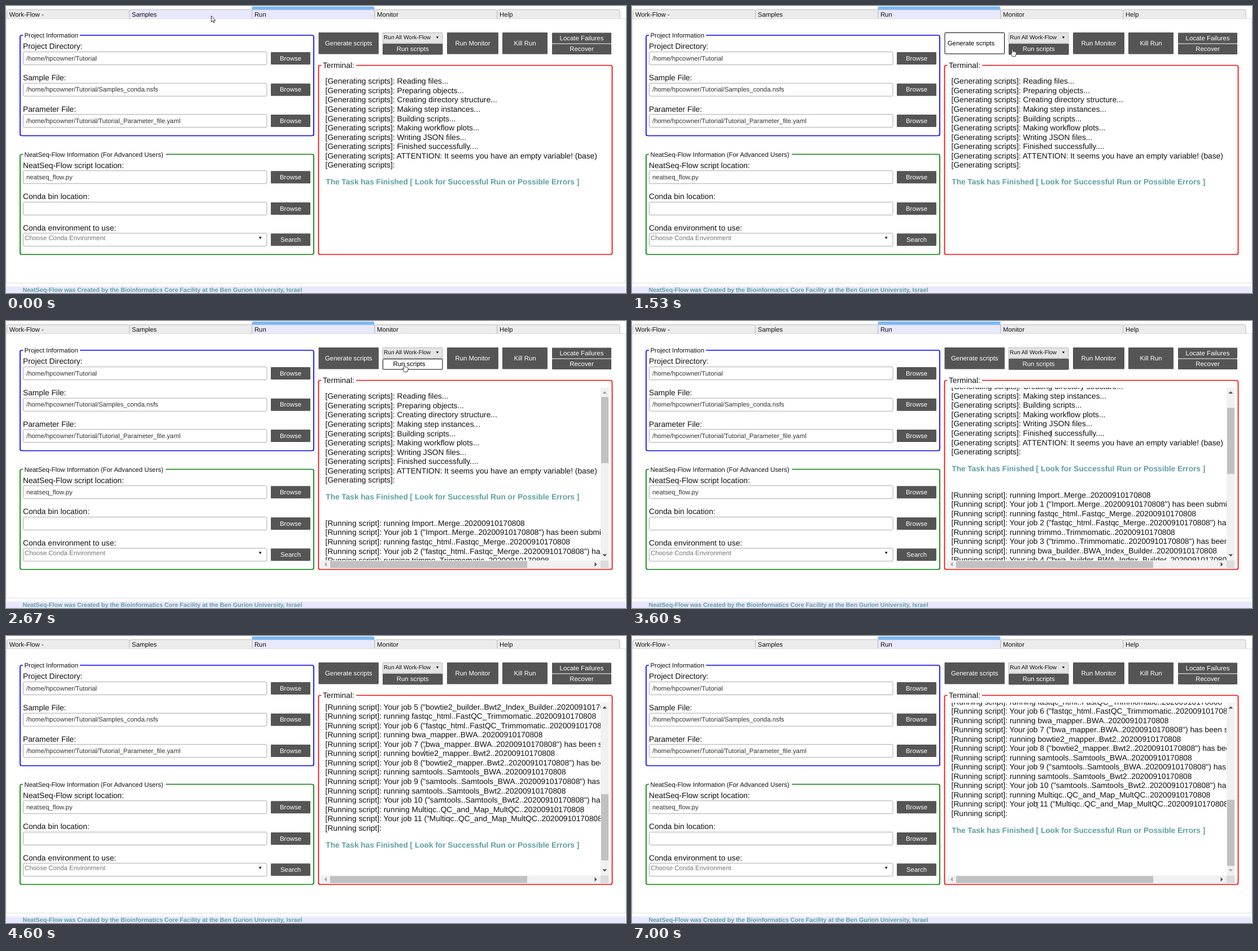
An HTML page with a canvas for the animation above (7.59 s loop, 1098 px wide and 510 px high).

```html
<!DOCTYPE html>
<html lang="en">
<head>
<meta charset="utf-8">
<title>Workflow runner</title>
<style>
html, body { margin: 0; width: 100%; height: 100%; overflow: hidden; background: #fff; }
canvas { display: block; width: 1098px; height: 510px; }
</style>
</head>
<body>
<canvas id="stage" width="1098" height="510"></canvas>
<script>
const ctx = document.getElementById('stage').getContext('2d');
const LOOP = 7590, TICK = 1000 / 15;
const SMALL = 11.39, BIG = 13.76, BOLD = 13.67, LINE = 16.52;
const DARK = [85, 85, 85], WHITE = [255, 255, 255], BLACK = [0, 0, 0];
const LAVENDER = '#e8e8ff', TEAL = '#5f9ea0', INK = '#111';
const VIEW = { x: 558, y: 118.5, w: 495, h: 307 };
const MAX_SCROLL = 407.6, RUN_AT = 2470;

// Terminal contents, y is the middle of the line before scrolling
const stages = ['Reading files...', 'Preparing objects...', 'Creating directory structure...',
  'Making step instances...', 'Building scripts...', 'Making workflow plots...',
  'Writing JSON files...', 'Finished successfully....',
  'ATTENTION: It seems you have an empty variable! (base)', ''];
const jobs = ['Import..Merge', 'fastqc_html..Fastqc_Merge', 'trimmo..Trimmomatic',
  'bwa_builder..BWA_Index_Builder', 'bowtie2_builder..Bwt2_Index_Builder',
  'fastqc_html..FastQC_Trimmomatic', 'bwa_mapper..BWA', 'bowtie2_mapper..Bwt2',
  'samtools..Samtools_BWA', 'samtools..Samtools_Bwt2', 'Multiqc..QC_and_Map_MultQC'];
const DONE = 'The Task has Finished [ Look for Successful Run or Possible Errors ]';

const generated = stages.map((s, i) => ({ s: '[Generating scripts]: ' + s, y: 133.5 + i * LINE }));
generated.push({ s: DONE, y: 312.5, bold: true });
const ran = [];
const addRun = s => ran.push({ s: '[Running script]: ' + s, y: 359 + ran.length * LINE });
jobs.forEach((job, i) => {
  const id = job + '..20200910170808';
  addRun('running ' + id);
  addRun(`Your job ${i + 1} ("${id}") has been submitted`);
});
addRun('');
ran.push({ s: DONE, y: 753, bold: true });

// Keyframes: time followed by values
const cursorKeys = [
  [0, 363, 17.5], [200, 363, 17.5], [470, 405, 26], [800, 520, 52], [1000, 557, 60],
  [1270, 606, 66], [1530, 672.5, 76], [1700, 700, 81], [2000, 705, 77], [3260, 705, 77],
  [3600, 741.5, 201], [5930, 741.5, 201], [6000, 737, 210], [6730, 722.5, 275.5], [7000, 718, 300.5]
];
const scrollKeys = [
  [3530, 0], [3800, 190.5], [3935, 190.5], [4000, 285.8], [4535, 285.8],
  [4600, 381.5], [4667, 400], [4733, MAX_SCROLL]
];

const mix = (a, b, p) => a + (b - a) * p;
const clamp = v => Math.max(0, Math.min(1, v));
const rgb = (a, b, p) => `rgb(${a.map((v, i) => Math.round(mix(v, b[i], p)))})`;

function track(keys, t) {
  if (t <= keys[0][0]) return keys[0].slice(1);
  for (let i = 1; i < keys.length; i++) {
    const a = keys[i - 1], b = keys[i];
    if (t < b[0]) {
      const p = (t - a[0]) / (b[0] - a[0]);
      return a.slice(1).map((v, j) => mix(v, b[j + 1], p));
    }
  }
  return keys[keys.length - 1].slice(1);
}

// Hover amount with a 0.4 s transition in and out
function hover(t, from, to) {
  const ease = p => 1 - (1 - p) ** 2.4;
  return t < to ? ease(clamp((t - from) / 400)) : 1 - ease(clamp((t - to) / 400));
}

function text(s, x, y, size = SMALL, color = INK, align = 'left', bold = false) {
  ctx.font = `${bold ? 'bold ' : ''}${size}px "Liberation Sans", Arial, sans-serif`;
  ctx.textAlign = align;
  ctx.fillStyle = color;
  ctx.fillText(s, x, y + size * 0.36);
}

function rect(x, y, w, h, color) {
  ctx.fillStyle = color;
  ctx.fillRect(x, y, w, h);
}

function box(x, y, w, h, r, fill, stroke, width = 1) {
  ctx.beginPath();
  ctx.roundRect(x, y, w, h, r);
  if (fill) { ctx.fillStyle = fill; ctx.fill(); }
  if (stroke) { ctx.strokeStyle = stroke; ctx.lineWidth = width; ctx.stroke(); }
}

function shape(points, fill, stroke, width = 1) {
  ctx.beginPath();
  points.forEach(([x, y]) => ctx.lineTo(x, y));
  ctx.closePath();
  ctx.fillStyle = fill;
  ctx.fill();
  if (stroke) { ctx.strokeStyle = stroke; ctx.lineWidth = width; ctx.stroke(); }
}

function button(label, x, y, w, h, hot = 0) {
  box(x, y, w, h, 1, rgb(DARK, WHITE, hot));
  if (hot > 0) box(x + 0.5, y + 0.5, w - 1, h - 1, 1, null, rgb(DARK, BLACK, hot));
  text(label, x + w / 2 - 6.3 * hot, y + h / 2 - 0.4, SMALL, rgb(WHITE, BLACK, hot), 'center');
}

function fieldset(title, x, y, w, h, gapEnd, color, size) {
  box(x, y, w, h, 3, null, color, 1.7);
  rect(x + 5, y - 3, gapEnd - x - 5, 6, '#fff');
  text(title, x + 7.5, y, size);
}

function field(label, value, y, action) {
  text(label, 30, y - 21, BIG);
  box(30.5, y - 11, 431.5, 23, 2, '#fff', '#aaa');
  text(value, 36, y, SMALL, '#333');
  button(action, 469, y - 10.5, 70, 22);
}

function dropArrow(x, y, w, h) {
  shape([[x - w / 2, y], [x + w / 2, y], [x, y + h]], '#000');
}

function tabs(overSamples) {
  ['Work-Flow -', 'Samples', 'Run', 'Monitor', 'Help'].forEach((name, i) => {
    const x = 1.5 + i * 217.1, active = i === 2;
    const lit = active || (i === 1 && overSamples);
    box(x, 6.5, 217.1, 16, [3, 3, 0, 0], lit ? LAVENDER : '#ececec', '#bbb');
    if (active) box(x - 0.5, 1, 217.5, 5.5, [3, 3, 0, 0], '#7ab8f5');
    text(name, x + 4.2, 15);
  });
  rect(0, 22, 1098, 1, '#ddd');
  rect(0, 22, 1, 471, '#ddd');
  rect(1096.5, 22, 1, 471, '#ddd');
  rect(0, 492, 1098, 1, '#ddd');
}

function forms() {
  fieldset('Project Information', 25, 52, 520, 178.5, 131, '#00f', SMALL);
  field('Project Directory:', '/home/hpcowner/Tutorial', 92.5, 'Browse');
  field('Sample File:', '/home/hpcowner/Tutorial/Samples_conda.nsfs', 148.2, 'Browse');
  field('Parameter File:', '/home/hpcowner/Tutorial/Tutorial_Parameter_file.yaml', 203.6, 'Browse');
  fieldset('NeatSeq-Flow Information (For Advanced Users)', 25, 263.5, 520, 178, 283, '#008000', SMALL);
  field('NeatSeq-Flow script location:', 'neatseq_flow.py', 303.7, 'Browse');
  field('Conda bin location:', '', 359.4, 'Browse');
  field('Conda environment to use:', '', 414.8, 'Search');
  text('Choose Conda Environment', 33, 412.3, SMALL, '#757575');
  dropArrow(450.2, 410.2, 4.6, 4);
}

function toolbar(t) {
  button('Generate scripts', 553.5, 47, 106.5, 38.5, hover(t, 1000, 1534));
  box(667, 47.5, 106, 18.5, 1, '#e4e4e4', '#bbb');
  text('Run All Work-Flow', 669, 55.8, 10.15);
  dropArrow(764, 54.2, 4.4, 3.6);
  button('Run scripts', 667, 67, 106.5, 19.5, hover(t, 1534, 3300));
  button('Run Monitor', 781, 47, 91, 38.5);
  button('Kill Run', 879, 47, 80, 38.5);
  button('Locate Failures', 967, 47.5, 105, 19);
  button('Recover', 967, 67.5, 105, 18.5);
}

function arrow(x, y, dx, dy, enabled) {
  shape([[x + dx * 2, y + dy * 2], [x - dx * 2 + dy * 4, y - dy * 2 + dx * 4],
    [x - dx * 2 - dy * 4, y - dy * 2 - dx * 4]], enabled ? '#505050' : '#a3a3a3');
}

function scrollbars(scroll) {
  rect(1053, 118.5, 14.5, 307, '#f1f1f1');
  rect(558, 425.5, 495, 14, '#f1f1f1');
  rect(1053, 425.5, 14.5, 14, '#dcdcdc');
  rect(1054, 135 + scroll / MAX_SCROLL * 156, 13, 117.5, '#c1c1c1');
  rect(574, 426.5, 349, 12.5, '#c1c1c1');
  arrow(1060.3, 127, 0, -1, scroll > 0);
  arrow(1060.3, 416.5, 0, 1, scroll < MAX_SCROLL);
  arrow(566, 432.5, -1, 0, false);
  arrow(1044.5, 432.5, 1, 0, true);
}

function terminal(t) {
  const running = t >= RUN_AT;
  const scroll = track(scrollKeys, t)[0];
  fieldset('Terminal:', 553.5, 105.5, 520, 336, 620, '#f00', BIG);
  ctx.save();
  ctx.beginPath();
  ctx.rect(VIEW.x, VIEW.y, VIEW.w, VIEW.h);
  ctx.clip();
  for (const { s, y, bold } of running ? generated.concat(ran) : generated) {
    if (bold) text(s, 566.3, y - scroll, BOLD, TEAL, 'left', true);
    else text(s, 565.6, y - scroll, BIG);
  }
  ctx.restore();
  if (running) scrollbars(scroll);
}

function pointer(x, y) {
  const pts = [[0, 0], [0, 11], [2.5, 8.7], [4.2, 12.5], [5.8, 11.8], [4.2, 8.2], [7.4, 8.2]];
  shape(pts.map(([a, b]) => [x + 0.5 + a, y + b]), '#fff', '#222', 0.9);
}

function hand(x, y) {
  const pts = [[-0.9, 0.8], [0, 0.2], [1, 0.8], [1, 4.6], [3, 4.7], [4.8, 5.3], [6.4, 6.1],
    [6.8, 7.5], [6.2, 10.5], [5.2, 13.5], [-0.2, 13.5], [-2.2, 10], [-3, 7.6], [-2, 7.1], [-0.9, 8.5]];
  shape(pts.map(([a, b]) => [x + a + 0.5, y + b]), '#fff', '#222', 0.9);
}

function beam(x, y) {
  rect(x - 0.5, y - 5, 1, 10, '#555');
  for (const dy of [-5.5, 4.5]) rect(x - 2.5, y + dy, 5, 1, '#777');
}

function draw(ms) {
  const t = Math.floor((ms + 4) / TICK) * TICK + 1;
  const [x, y] = track(cursorKeys, t);
  rect(0, 0, 1098, 510, '#fff');
  tabs(y < 22);
  forms();
  toolbar(t);
  terminal(t);
  rect(0, 498.5, 1097, 11.5, LAVENDER);
  text('NeatSeq-Flow was Created by the Bioinformatics Core Facility at the Ben Gurion University, Israel',
    29.5, 504, 10.66, TEAL, 'left', true);
  if (y > 119) beam(x, y);
  else if (t >= 1000 && y < 86) hand(x, y);
  else pointer(x, y);
}

ctx.textRendering = 'geometricPrecision';
const start = performance.now();
function frame() {
  draw((performance.now() - start) % LOOP);
  requestAnimationFrame(frame);
}
frame();
</script>
</body>
</html>
```
